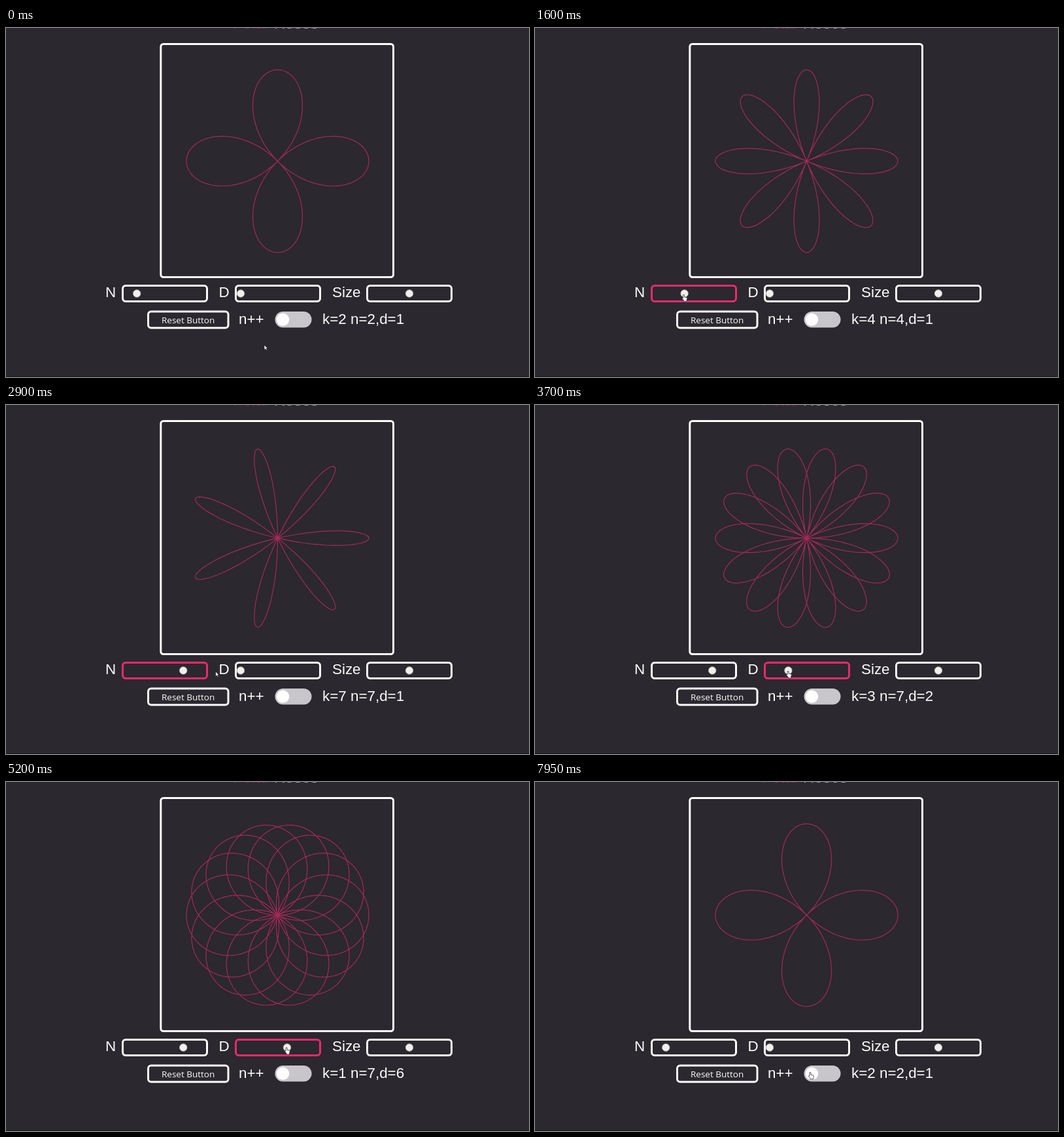
Write an HTML page that moves like this. It is 800 px wide and 533 px high and loops after 8 s.

```html
<!DOCTYPE html>
<html lang="en">
<head>
<meta charset="utf-8">
<title>Polar Roses</title>
<style>
  html, body { margin: 0; height: 100%; overflow: hidden; background: #2b282f; }
  svg { display: block; width: 800px; height: 533px; font: 22.4px "Liberation Sans", Arial, sans-serif; fill: #fdfdfb; }
  .box { fill: none; stroke: #fdfdfb; stroke-width: 3; }
  .box.on { stroke: #ec2a6c; }
  .pink, .on + text tspan { fill: #ec2a6c; }
  .title { font-size: 24px; opacity: .55; }
  .button { font: 13.5px "Open Sans", sans-serif; }
  .thumb { fill: #f0f0ec; stroke: #b5b4b5; stroke-width: .8; }
  #rose { fill: none; stroke: #ec2a6c; stroke-width: 1.2; stroke-opacity: .63; stroke-linejoin: round; }
  .cursor { fill: #fff; stroke: #151318; stroke-width: .7; stroke-linejoin: round; }
</style>
</head>
<body>
<svg viewBox="0 0 800 533">
  <text class="title" x="347" y="1.2"><tspan class="pink">Polar</tspan> Roses</text>
  <rect class="box" x="236.8" y="24.5" width="355.7" height="356" rx="4"/>
  <path id="rose"/>

  <text x="152" y="411.3">N</text>
  <rect class="box" id="boxN" x="178.5" y="393.5" width="129" height="24" rx="4.5"/>
  <circle class="thumb" id="thumbN" cy="405.5" r="5.7"/>
  <text x="325.5" y="411.3">D</text>
  <rect class="box" id="boxD" x="351.5" y="393.5" width="129" height="24" rx="4.5"/>
  <circle class="thumb" id="thumbD" cy="405.5" r="5.7"/>
  <text x="499" y="411.3">Size</text>
  <rect class="box" x="552.5" y="393.5" width="129" height="24" rx="4.5"/>
  <circle class="thumb" cx="617" cy="405.5" r="5.7"/>

  <rect class="box" id="reset" x="217.5" y="433" width="122.5" height="25" rx="4.5"/>
  <text class="button" x="238" y="451"><tspan>Reset</tspan> Button</text>
  <text x="356" y="452.3">n++</text>
  <rect x="411.5" y="433" width="56" height="24.5" rx="12.2" fill="#c8c6cb"/>
  <circle cx="423.5" cy="445.3" r="9.7" fill="#fefefe"/>
  <text id="label" x="484" y="452.3"></text>
  <rect y="532" width="800" height="1" fill="#19171b"/>

  <path class="cursor" id="arrow" d="M0 0V7.6L1.8 6L3 8.6L4.3 8L3.1 5.5H5.4Z"/>
  <path class="cursor" id="hand" d="M-1 1Q0 -.6 1 1V4.2L4.6 5Q5.6 5.3 5.4 6.6L4.6 9V11H0V9.4L-2.6 6.6Q-2.6 5 -1 6Z"/>
</svg>
<script>
const LOOP = 8000, CX = 415.5, CY = 203.3, RADIUS = 139.5;
const STEP = 14.2;  // slider travel per unit
const LAG = 100;    // the drawing follows the sliders a little later
const RESET = 6500;
const $ = id => document.getElementById(id);

// Pointer moves: begin, end, x, y; it rests in between
const moves = [
  [0, 0, 395, 484], [50, 290, 506, 400], [290, 420, 400, 333], [420, 600, 168, 360],
  [600, 700, 200, 392], [700, 850, 199, 405], [950, 1750, 234, 407], [1800, 2200, 263, 408],
  [2200, 2400, 272, 408], [2650, 3100, 359, 406], [3350, 3700, 387, 406], [3700, 4150, 415, 406],
  [5050, 5100, 429, 405], [5750, 6300, 284, 450], [6950, 7600, 358, 452], [7650, 7950, 421, 443]
];

// Each slider follows the pointer while it is dragged
const sliders = {
  N: { left: 186, from: 850, to: 2650, initial: 2 },
  D: { left: 359, from: 3100, to: 5750, initial: 1 }
};

function pointerAt(t) {
  let x = 0, y = 0;
  for (const [begin, end, x1, y1] of moves) {
    if (t < begin) break;
    const f = t < end ? (t - begin) / (end - begin) : 1;
    x += (x1 - x) * f;
    y += (y1 - y) * f;
    if (t < end) break;
  }
  return [x, y];
}

function valueAt({ left, from, to, initial }, t) {
  if (t < from || t >= RESET) return initial;
  const [x] = pointerAt(Math.min(t, to));
  return 1 + Math.round((x - left) / STEP);
}

function rose(n, d) {
  const points = [], count = 480 * d;
  for (let i = 0; i <= count; i++) {
    const a = i / count * 2 * Math.PI * d;
    const r = RADIUS * Math.cos(n / d * a);
    points.push((CX + r * Math.cos(a)).toFixed(2) + " " + (CY + r * Math.sin(a)).toFixed(2));
  }
  return "M" + points.join("L");
}

const inside = ([x, y], l, t, r, b) => x > l && x < r && y > t && y < b;

let shown = "";
function render(t) {
  for (const [name, s] of Object.entries(sliders)) {
    $("thumb" + name).setAttribute("cx", s.left + STEP * (valueAt(s, t) - 1));
  }

  const drawn = Math.max(0, t - LAG);
  const n = valueAt(sliders.N, drawn), d = valueAt(sliders.D, drawn);
  const label = `k=${Math.floor(n / d)} n=${n},d=${d}`;
  if (label !== shown) {
    $("label").textContent = shown = label;
    $("rose").setAttribute("d", rose(n, d));
  }

  const p = pointerAt(t);
  const onButton = inside(p, 216, 431, 341, 460);
  const onSlider = [177, 350, 551].some(x => inside(p, x, 393, x + 131, 419));
  const isHand = onButton || onSlider || inside(p, 412, 433, 467, 457);
  $("boxN").classList.toggle("on", t >= sliders.N.from && t < sliders.D.from);
  $("boxD").classList.toggle("on", t >= sliders.D.from && t < 6300);
  $("reset").classList.toggle("on", onButton);
  for (const [id, visible] of [["hand", isHand], ["arrow", !isHand]]) {
    $(id).setAttribute("transform", `translate(${p})`);
    $(id).setAttribute("visibility", visible ? "visible" : "hidden");
  }
}

const start = performance.now();
function tick() {
  render((performance.now() - start) % LOOP);
  requestAnimationFrame(tick);
}
tick();
</script>
</body>
</html>
```
